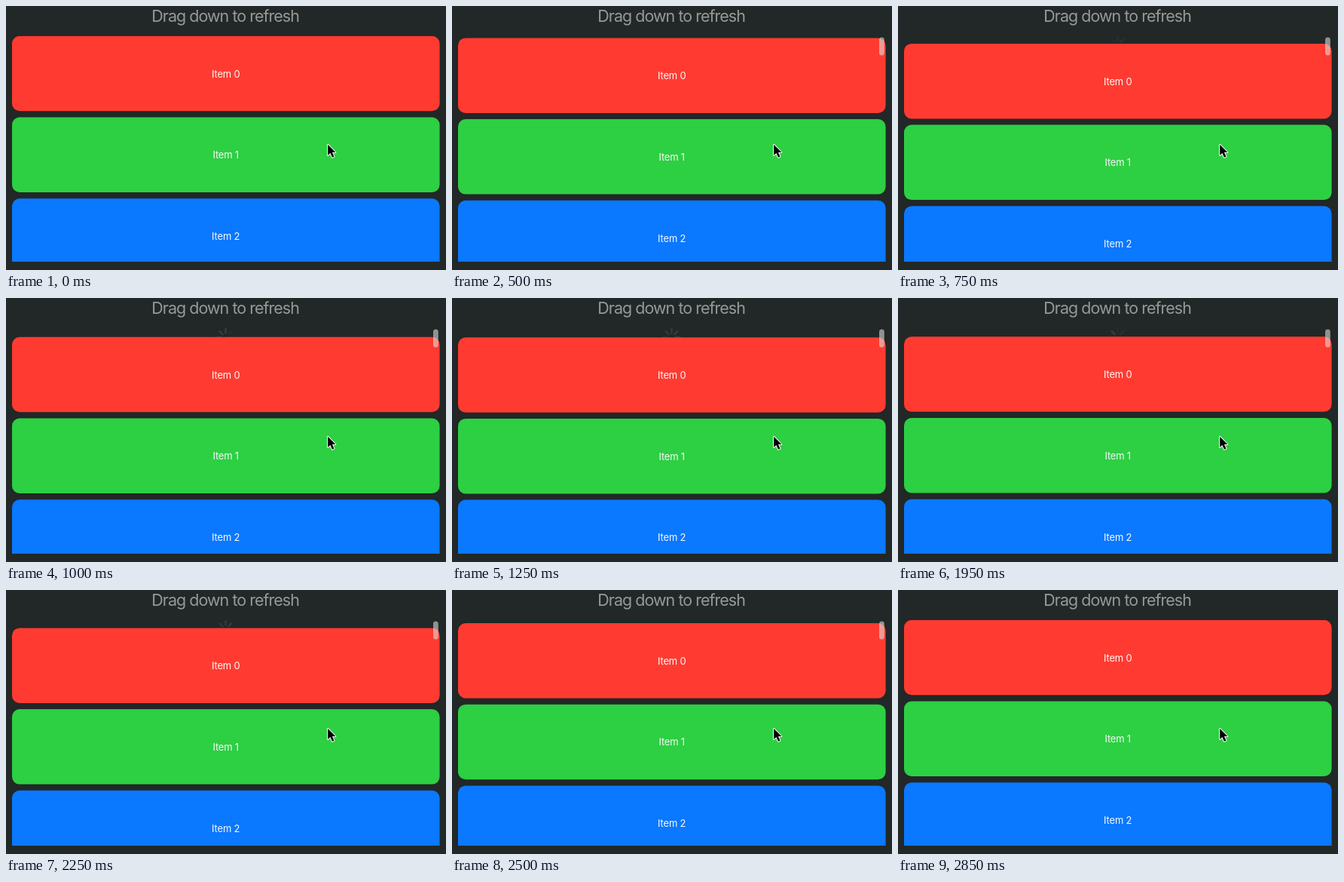
An HTML page with a canvas for the animation above (2900 ms loop, 584x350 px).

```html
<!DOCTYPE html>
<html lang="en">
<head>
<meta charset="utf-8">
<title>Pull to refresh</title>
<style>
  html, body { margin: 0; width: 100%; height: 100%; overflow: hidden; background: #222727; }
  canvas { display: block; width: 584px; height: 350px; }
</style>
</head>
<body>
<canvas id="stage" width="584" height="350"></canvas>
<script>
const ctx = document.getElementById('stage').getContext('2d');
const LOOP = 2900;
const LIST = { x: 8, y: 39.8, w: 567.6, bottom: 339 };
const CARD = { h: 99.5, pitch: 107.7, r: 10 };
const COLORS = ['#ff3b31', '#2dcf43', '#0a78ff'];
const FONT = 'Inter, "Liberation Sans", sans-serif';

// [time, pull distance]
const PULL = [[0, 0], [300, 0], [500, 2.6], [750, 10.1], [1000, 12], [1250, 12.4],
              [1650, 12], [2250, 10.6], [2500, 4.2], [2700, 0.7], [2850, 0], [2900, 0]];

const clamp = v => Math.max(0, Math.min(1, v));
const ramp = (t, a, b) => clamp((t - a) / (b - a));

function slope(i) {
  if (i === 0 || i === PULL.length - 1) return 0;
  const [a, b, c] = PULL.slice(i - 1, i + 2);
  const m = (b[1] - a[1]) / (b[0] - a[0]);
  const n = (c[1] - b[1]) / (c[0] - b[0]);
  return m * n > 0 ? 2 * m * n / (m + n) : 0;
}

// Monotone cubic through the pull points
function pullAt(t) {
  let i = 0;
  while (i < PULL.length - 2 && t >= PULL[i + 1][0]) i++;
  const [t0, y0] = PULL[i], [t1, y1] = PULL[i + 1];
  const d = t1 - t0, u = (t - t0) / d, v = 1 - u;
  return y0 * (1 + 2 * u) * v * v + slope(i) * d * u * v * v
       + y1 * u * u * (3 - 2 * u) - slope(i + 1) * d * u * u * v;
}

function box(x, y, w, h, r, fill) {
  ctx.beginPath();
  ctx.roundRect(x, y, w, h, r);
  ctx.fillStyle = fill;
  ctx.fill();
}

function label(text, x, y, size, spacing, fill) {
  ctx.font = `400 ${size}px ${FONT}`;
  ctx.letterSpacing = spacing + 'px';
  ctx.textAlign = 'center';
  ctx.fillStyle = fill;
  ctx.fillText(text, x + spacing / 2, y);
}

function spinner(t, pull) {
  const show = ramp(pull, 6, 11);
  if (!show) return;
  const head = t / 125;
  ctx.lineWidth = 2.6;
  ctx.lineCap = 'round';
  for (let i = 0; i < 8; i++) {
    const age = (((head - i) % 8) + 8) % 8;
    const a = (i - 2) * Math.PI / 4;
    const c = Math.cos(a), s = Math.sin(a);
    ctx.strokeStyle = `rgba(255,255,255,${show * (0.02 + 0.08 * (1 - age / 8))})`;
    ctx.beginPath();
    ctx.moveTo(291.5 + c * 5.5, 52 + s * 5.5);
    ctx.lineTo(291.5 + c * 11, 52 + s * 11);
    ctx.stroke();
  }
}

function cursor(x, y) {
  const p = new Path2D('M0 0V14.2L3.2 11.2L5.8 17L8.3 15.9L5.8 10.3H10.2Z');
  ctx.save();
  ctx.translate(x, y);
  ctx.lineJoin = 'round';
  ctx.lineWidth = 2;
  ctx.strokeStyle = '#fff';
  ctx.stroke(p);
  ctx.fillStyle = '#000';
  ctx.fill(p);
  ctx.restore();
}

function draw(t) {
  const pull = pullAt(t);
  ctx.fillStyle = '#222727';
  ctx.fillRect(0, 0, 584, 350);
  label('Drag down to refresh', 291.6, 21.3, 21.5, -0.98, '#969999');

  ctx.save();
  ctx.beginPath();
  ctx.rect(0, LIST.y, 584, LIST.bottom - LIST.y);
  ctx.clip();
  spinner(t, pull);
  COLORS.forEach((color, i) => {
    const y = LIST.y + pull + i * CARD.pitch;
    box(LIST.x, y, LIST.w, CARD.h, CARD.r, color);
    label('Item ' + i, 291.8, y + 54.8, 13, -0.2, '#f8f8f8');
  });
  const bar = ramp(t, 350, 450) * (1 - ramp(t, 2550, 2800));
  if (bar) box(567, 41.5, 6.8, 24, 3.4, `rgba(225,225,225,${0.58 * bar})`);
  ctx.restore();

  cursor(427.2, 183.8);
}

function frame(now) {
  draw(now % LOOP);
  requestAnimationFrame(frame);
}
draw(0);
requestAnimationFrame(frame);
</script>
</body>
</html>
```
